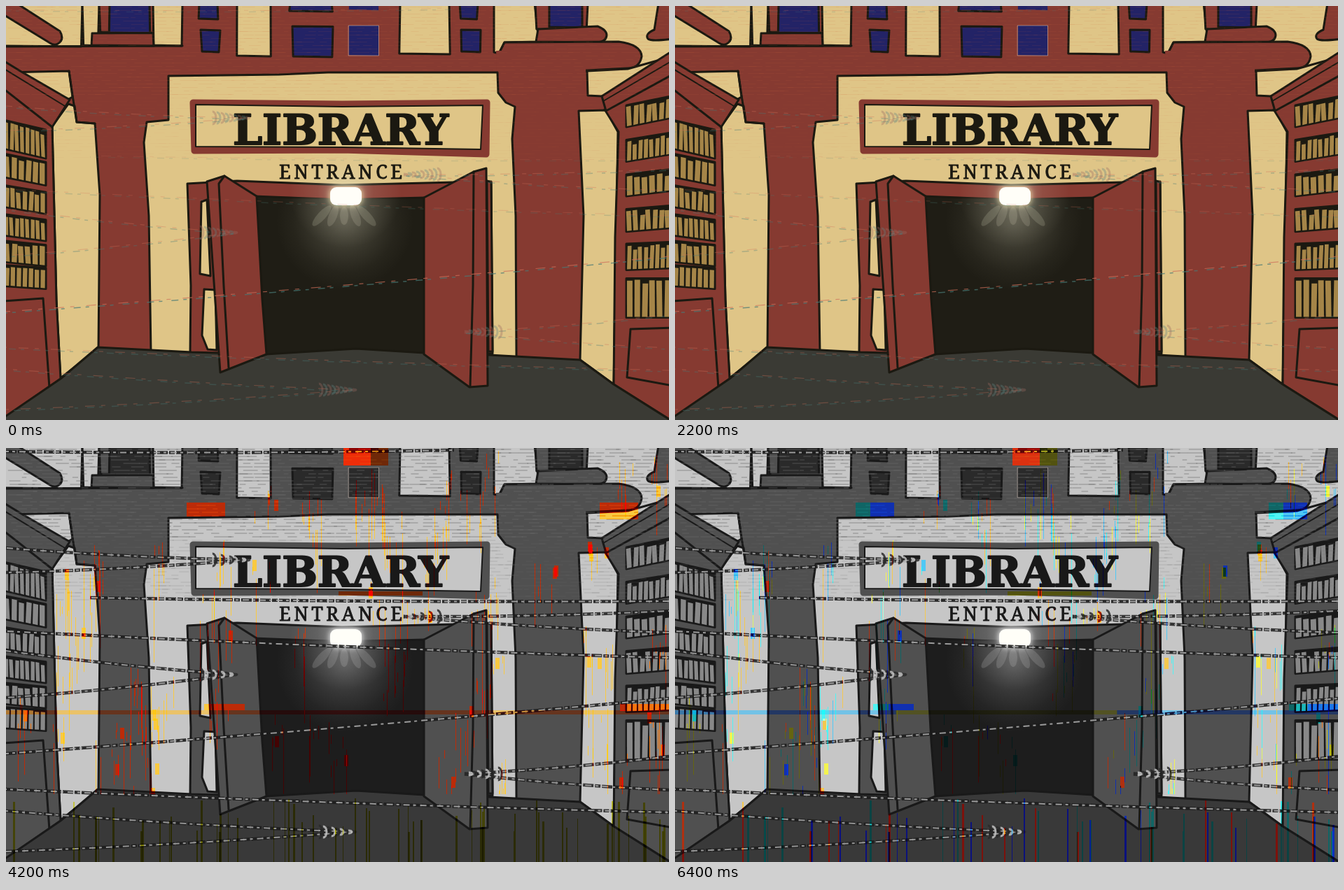
An HTML page with a canvas that plays this animation: 947 px wide and 592 px high, repeating every 6.6 s.

```html
<!DOCTYPE html>
<html lang="en">
<head>
<meta charset="utf-8">
<title>Library entrance</title>
<style>
html, body { margin: 0; width: 100%; height: 100%; overflow: hidden; background: #863a31; }
canvas { display: block; }
</style>
</head>
<body>
<canvas id="stage" width="947" height="592"></canvas>
<script>
const W = 947, H = 592;
const COLORS = {
  cream: '#dfc587', brick: '#863a31', ink: '#1b1911', floor: '#3a3a34',
  dark: '#1f1d15', night: '#232366', book: '#a58548'
};
let ctx, palette, grey;

const rgb = channels => `rgb(${channels.map(Math.round)})`;
const mix = (a, b, t) => a + (b - a) * t;

function toGrey(hex) {
  const [r, g, b] = [1, 3, 5].map(i => parseInt(hex.slice(i, i + 2), 16));
  return rgb(Array(3).fill(0.3 * r + 0.59 * g + 0.11 * b));
}
function makePalette() {
  return Object.fromEntries(Object.entries(COLORS).map(([name, hex]) => [name, grey ? toGrey(hex) : hex]));
}
function randomizer(seed) {
  return () => {
    seed = (seed * 1664525 + 1013904223) % 4294967296;
    return seed / 4294967296;
  };
}

function paint(fill, path, width = 3) {
  ctx.fillStyle = palette[fill];
  ctx.fill(path);
  ctx.strokeStyle = palette.ink;
  ctx.lineWidth = width;
  if (width) ctx.stroke(path);
}
const shape = (fill, points, width) => paint(fill, new Path2D(`M${points}Z`), width);
function line(points, width = 3) {
  ctx.strokeStyle = palette.ink;
  ctx.lineWidth = width;
  ctx.stroke(new Path2D(`M${points}`));
}
// A box with the slight lean of a hand-drawn one.
function box(fill, x0, y0, x1, y1, width) {
  const lean = 2 * Math.sin(x0);
  shape(fill, `${x0} ${y0} ${x1} ${y0 + lean / 2} ${x1 - lean} ${y1} ${x0 + lean} ${y1 - 1}`, width);
}

function upperStorey() {
  box('cream', -4, -4, 109, 58);
  box('cream', 109, -4, 133, 57);
  paint('brick', new Path2D('M-4 -8 L18 -2 L77 36 Q84 48 74 54 Q69 57 63 53 L-4 12 Z'));
  box('brick', 133, -4, 212, 38);
  box('night', 148, -4, 205, 39);
  box('cream', 210, -4, 252, 57);
  box('brick', 123, 39, 210, 57);
  for (const x of [276, 648]) {
    box('night', x, -4, x + 26, 19);
    box('night', x + 2, 34, x + 30, 66);
  }
  box('cream', 330, -4, 378, 72);
  box('night', 406, -4, 465, 8);
  box('night', 409, 29, 467, 73);
  box('night', 490, -4, 532, 6, 0);
  box('night', 490, 28, 532, 71, 0);
  ctx.strokeStyle = 'rgba(210,190,180,.55)';
  ctx.lineWidth = 1;
  ctx.strokeRect(489.5, 28, 43, 43);
  box('cream', 563, -4, 633, 69);
  shape('cream', '697 -4 755 -4 761 51 712 52 704 68 697 66');
  shape('cream', '829 -4 952 -4 952 82 830 94');
  box('brick', 756, -4, 831, 34);
  box('night', 776, -4, 823, 31);
  paint('brick', new Path2D('M760 33 L845 29 Q858 34 858 42 Q857 51 845 52 L757 51 Z'));
  paint('brick', new Path2D('M932 -4 L926 34 Q912 40 917 47 Q922 51 952 47 L952 -4 Z'));
  paint('brick', new Path2D('M712 52 L875 51 Q907 55 908 72 Q905 89 888 89 L830 92 L707 92 L704 68 Z'));
  box('brick', 700, 64, 829, 96, 0);
  line('-4 58 252 57');
}

function walls() {
  shape('cream', '-4 79 -4 95 90 93 95 130 88 134');
  shape('cream', '66 172 89 140 98 143 101 166 127 168 134 270 132 490 78 532 72 420');
  shape('cream', '232 100 390 98 460 95 702 95 703 124 714 138 727 144 723 190 728 300 729 502 207 496 204 300 197 195 201 166 232 163');
  shape('cream', '830 93 888 90 952 72 851 129 831 128');
  shape('cream', '818 150 857 149 874 180 868 541 820 506 825 300');
  line('90 93 95 128 101 166 127 168');
}

function shelfRow(x0, x1, top0, top1, height, seed) {
  const rnd = randomizer(seed), count = 6 + seed % 3;
  shape('ink', `${x0} ${top0} ${x1} ${top1} ${x1} ${top1 + height} ${x0} ${top0 + height}`);
  for (let i = 0; i < count; i++) {
    const a = i / count, b = (i + 0.84) / count, drop = 2 + rnd() * rnd() * 10;
    const xa = mix(x0, x1, a) + 1, xb = mix(x0, x1, b), lean = rnd() * 3 - 1.5;
    const ya = mix(top0, top1, a), yb = mix(top0, top1, b);
    shape('book', `${xa + lean} ${ya + drop} ${xb + lean} ${yb + drop} ${xb} ${yb + height - 1} ${xa} ${ya + height - 1}`, 0);
  }
}
function shelves() {
  shape('brick', '-4 116 66 172 72 420 78 533 -4 590');
  shape('brick', '-4 78 22 94 91 134 66 173 -4 118');
  line('-4 89 84 143', 2);
  line('-4 422 53 418 62 546');
  shape('brick', '855 148 952 92 952 594 868 541 870 330 875 180');
  shape('brick', '851 129 952 64 952 98 857 150');
  line('853 136 952 78', 2);
  line('952 460 892 462 887 531 952 543');
  // Rows flatten towards eye level.
  for (let i = 0; i < 6; i++) {
    const left = 163 + 50 * i - 1.7 * i * i, right = 142 + 49.5 * i;
    shelfRow(-3, 57, left, left + 14 - 2 * i, 30 + 11 * 0.3 ** i, i + 11);
    shelfRow(886, 950, right, right - 13 + 2.6 * i, 31 + 25 * (i / 5) ** 6, i + 31);
  }
}

function glow(x, y, radius, tint, strengths) {
  const g = ctx.createRadialGradient(x, y, 0, x, y, radius);
  strengths.forEach((a, i) => g.addColorStop(i / (strengths.length - 1), `rgba(${tint},${a})`));
  ctx.fillStyle = g;
  ctx.fillRect(x - radius, y - radius, radius * 2, radius * 2);
}
function doorway() {
  const tint = grey ? '225,225,225' : '225,222,195';
  shape('brick', '259 254 330 250 480 256 640 252 693 251 695 497 263 496 264 400');
  shape('dark', '355 272 480 277 598 274 598 505 371 505');
  shape('floor', '131 488 265 495 371 498 500 490 597 496 690 499 820 506 868 541 952 594 -4 594 -4 589 78 533');
  ctx.save();
  ctx.clip(new Path2D('M357 275 597 275 597 490 371 490Z'));
  glow(484, 308, 98, tint, [0.28, 0.19, 0.11, 0.04, 0]);
  ctx.restore();
  shape('cream', '279 280 287 277 292 386 277 383');
  shape('cream', '283 405 299 406 301 492 288 491 280 471');
  shape('brick', '287 251 312 243 358 272 366 420 372 498 306 524');
  line('312 243 304 254 311 400 318 517');
  shape('brick', '597 274 668 237 686 232 688 543 662 545 597 498');
  line('668 237 667 400 663 544');
  shape('brick', '687 250 693 252 695 494 689 494');
  glow(485, 266, 80, tint, [0.5, 0.12, 0]);
  ctx.fillStyle = `rgba(${tint},.17)`;
  for (let i = -2; i <= 2; i++) {
    ctx.beginPath();
    ctx.ellipse(483 + i * 16, 300, 6, 13 + Math.abs(i) * 3, -i * 0.37, 0, 7);
    ctx.fill();
  }
  ctx.save();
  ctx.shadowColor = grey ? '#fff' : '#fff0b8';
  ctx.shadowBlur = 9;
  ctx.fillStyle = '#fffef8';
  ctx.beginPath();
  ctx.roundRect(463, 259, 45, 26, 9);
  ctx.fill();
  ctx.restore();
}

function lettering(text, font, spacing, baseline, weight) {
  ctx.font = font;
  ctx.letterSpacing = `${spacing}px`;
  ctx.textAlign = 'center';
  ctx.fillStyle = ctx.strokeStyle = palette.ink;
  ctx.lineWidth = weight;
  ctx.fillText(text, 478 + spacing / 2, baseline);
  ctx.strokeText(text, 478 + spacing / 2, baseline);
}
function sign() {
  const board = new Path2D('M267 138 480 140 687 138 686 212 480 206 269 207Z');
  ctx.fillStyle = ctx.strokeStyle = palette.brick;
  ctx.lineWidth = 9;
  ctx.fill(board);
  ctx.stroke(board);
  shape('cream', '271 141 480 144 681 142 678 205 480 202 271 201', 2);
  lettering('LIBRARY', 'bold 60px "DejaVu Serif", serif', 0, 198, 2);
  lettering('ENTRANCE', '27px "Noto Serif", serif', 4.5, 247, 0.8);
}

// Arrow trails: tip, edge of the stage, and the heights where both strands meet it.
const ARROWS = [
  [325, 324, 0, 290, 357], [495, 549, 0, 519, 577], [655, 466, W, 441, 489],
  [568, 241, W, 233, 264], [343, 160, 0, 143, 178]
];
const CORDS = [[0, 437, W, 358], [0, 488, W, 521], [0, 262, W, 300], [0, 5, 640, 3], [120, 214, W, 219]];

function dashed(path, color, width, dash, offset = 0) {
  ctx.setLineDash(dash);
  ctx.lineDashOffset = offset;
  ctx.strokeStyle = color;
  ctx.lineWidth = width;
  ctx.stroke(path);
  ctx.setLineDash([]);
}
function cord(x0, y0, x1, y1, alpha) {
  const path = new Path2D(), lower = new Path2D();
  path.moveTo(x0, y0);
  path.quadraticCurveTo((x0 + x1) / 2, (y0 + y1) / 2 + 5, x1, y1);
  lower.addPath(path, new DOMMatrix([1, 0, 0, 1, 0, 2]));
  ctx.globalAlpha = alpha;
  if (grey) {
    dashed(path, '#1c1c1c', 4.5, [15, 2, 8, 2]);
    dashed(path, '#aaa', 2, [9, 5, 4, 6], y0);
  } else {
    dashed(path, '#cf705b', 1.2, [14, 9, 6, 17], y0);
    dashed(lower, '#497a75', 1.5, [10, 7, 5, 13], y1);
  }
}
function arrowHead(x, y, dir) {
  const tones = grey ? ['#2a2a2a', '#c0c0c0'] : ['#9b6a60', '#628580'];
  for (let k = 0; k < 9; k++) {
    const arc = new Path2D();
    arc.ellipse(x - dir * k * 6, y, 5, 1 + k, 0, -1.6, 1.6);
    dashed(arc, tones[k % 2], 3, []);
  }
}
function trails() {
  ctx.lineCap = 'butt';
  CORDS.forEach((c, i) => cord(...c, grey ? 0.9 : 0.7 / (1 + i)));
  for (const [x, y, edge, high, low] of ARROWS) {
    cord(edge, high, x, y, grey ? 0.85 : 0.35);
    cord(edge, low, x, y, grey ? 0.85 : 0.35);
    arrowHead(x, y, edge ? -1 : 1);
  }
  ctx.globalAlpha = 1;
}

function scanTexture() {
  const rnd = randomizer(7);
  ctx.fillStyle = grey ? '#696969' : '#cd5f41';
  for (let y = 1; y < 218; y += 5) {
    ctx.globalAlpha = (grey ? 0.3 : 0.1) * (y < 130 ? 1 : 0.4);
    for (let x = rnd() * 30; x < W; x += 10 + rnd() * 26) ctx.fillRect(x, y, 6 + rnd() * 20, grey ? 2 : 1);
  }
  ctx.globalAlpha = 1;
}

const ORANGE = [1, 0.7, 0], AZURE = [0, 0.7, 1], YELLOW = [0.9, 0.9, 0], TEAL = [0, 0.9, 0.9];
const BURSTS = [
  { hues: [TEAL, AZURE, ORANGE, YELLOW], floor: [AZURE, TEAL], alpha: 0.45, power: 0.45 },
  { hues: [ORANGE], floor: [YELLOW], alpha: 0.9, power: 0.6 },
  { hues: [TEAL, AZURE, ORANGE, YELLOW], floor: [AZURE, ORANGE, TEAL], alpha: 0.8, power: 0.6 }
];
const BLOCKS = [[258, 78, 55, 20], [848, 78, 55, 24], [283, 366, 58, 9], [877, 366, 70, 10]];

// Lifts the strong channels and sinks the weak ones, so the result follows the tone below.
function tint(hue, power, x, y, w, h) {
  ctx.globalCompositeOperation = 'color-dodge';
  ctx.fillStyle = rgb(hue.map(v => 255 * power * v ** 6));
  ctx.fillRect(x, y, w, h);
  ctx.globalCompositeOperation = 'color-burn';
  ctx.fillStyle = rgb(hue.map(v => 255 * (0.28 + 0.72 * v)));
  ctx.fillRect(x, y, w, h);
}
function glitch({ hues, floor, alpha, power }) {
  const rnd = randomizer(5);
  const pick = list => list[Math.floor(rnd() * list.length)];
  ctx.globalAlpha = alpha;
  for (let group = 0; group < 60; group++) {
    const center = rnd() * W, top = rnd() * 440;
    for (let i = 0; i < 6; i++) {
      const x = Math.round(center + (rnd() - 0.5) * 36), y = Math.round(top + rnd() * 60);
      const wide = rnd() < 0.1, height = wide ? 16 : 10 + rnd() * rnd() * 130;
      tint(pick(hues), power, x, y, wide ? 6 : 1, Math.min(height, 495 - y));
    }
  }
  for (let i = 0; i < 60; i++) {
    const y = Math.round(500 + rnd() * 50);
    tint(pick(floor), floor[0] === YELLOW ? 0 : power, Math.round(rnd() * W), y, 1 + Math.floor(rnd() * 3), H - y);
  }
  const hue = i => hues[i % hues.length];
  for (const [x, y, w, h] of BLOCKS) {
    tint(hue(0), power, x, y, w * 0.38, h);
    tint(hue(1), power, x + w * 0.38, y, w * 0.62, h);
  }
  tint(hue(2), power * 1.2, 482, 0, 39, 25);
  tint(hue(3), power * 0.5, 521, 0, 25, 25);
  tint(hue(3), power * 0.5, 475, 205, 120, 6);
  ctx.globalAlpha = alpha * 0.7;
  [1, 3, 1].forEach((h, i) => tint(hue(h), power * 0.5, i * W / 3, 375, W / 3, 6));
}

function render(burst) {
  const canvas = document.createElement('canvas');
  canvas.width = W;
  canvas.height = H;
  ctx = canvas.getContext('2d');
  grey = Boolean(burst);
  palette = makePalette();
  ctx.lineJoin = ctx.lineCap = 'round';
  ctx.fillStyle = palette.brick;
  ctx.fillRect(0, 0, W, H);
  upperStorey();
  walls();
  shelves();
  doorway();
  scanTexture();
  sign();
  trails();
  if (burst) glitch(burst);
  return canvas;
}

const calm = render();
const bursts = BURSTS.map(render);
const stage = document.getElementById('stage').getContext('2d');

function frame() {
  const t = performance.now() % 6600;
  stage.drawImage(t % 2200 < 2000 ? calm : bursts[Math.floor(t / 2200)], 0, 0);
  requestAnimationFrame(frame);
}
frame();
</script>
</body>
</html>
```
